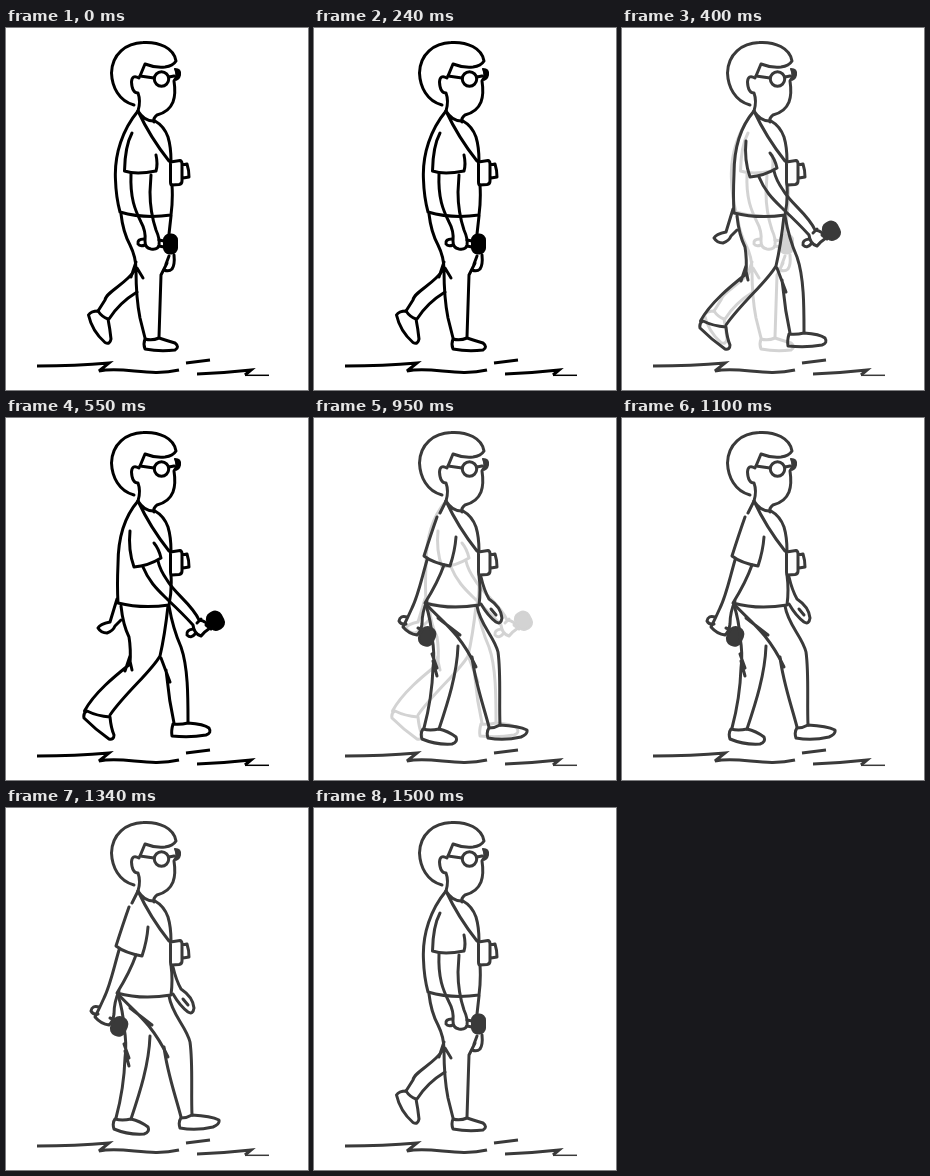
Recreate the animation shown at these times as an HTML page without scripts. Size 302 by 362 pixels, loop 1.65 s.

```html
<!DOCTYPE html>
<html lang="en">
<head>
<meta charset="utf-8">
<title>Walk cycle</title>
<style>
  html, body { margin: 0; width: 100%; height: 100%; overflow: hidden; background: #fff; }
  svg {
    display: block; width: 302px; height: 362px;
    fill: none; stroke: currentColor; stroke-width: 3;
    stroke-linecap: round; stroke-linejoin: round;
  }
  svg, .pose { animation: ink 1650ms step-end infinite; }
  .pose { opacity: 0; }
  .pass { animation-name: pass; }
  .reach { animation-name: reach; }
  .trail { animation-name: trail; }
  .solid { fill: currentColor; stroke-width: 2; }
  .ground { stroke-linecap: butt; stroke-linejoin: miter; }

  @keyframes ink {
    0%, 33.333%, 100% { color: #000; }
    24.242%, 57.576% { color: #3a3a3a; }
  }
  /* each pose leaves a faint afterimage for 150 ms */
  @keyframes pass {
    0%, 90.909%, 100% { opacity: 1; }
    24.242% { opacity: .22; }
    33.333% { opacity: 0; }
  }
  @keyframes reach {
    0%, 66.667%, 100% { opacity: 0; }
    24.242% { opacity: 1; }
    57.576% { opacity: .22; }
  }
  @keyframes trail {
    0%, 90.909%, 100% { opacity: 0; }
    57.576% { opacity: 1; }
  }
</style>
</head>
<body>
<svg viewBox="0 0 302 362">
  <g class="pose pass">
    <!-- shirt -->
    <path d="M126 105Q119 118 118.500 143Q130 147 150 143Q152 136 150 127"/>
    <path d="M132 83C117 101 108 126 109.500 152Q110 169 114 184Q138 191 165 187Q167 172 166 157"/>
    <!-- arm and rattle -->
    <path d="M125 146C124 170 129 182 135 194Q140 203 139 213Q139 220 145 221Q152 222 153 217Q154 211 150 202Q144 184 144 164L145 147"/>
    <path d="M138 211Q131 211 132 216Q134 219 139 217M153 212L158 213M153 218L158 219"/>
    <rect class="solid" x="158" y="206.500" width="13" height="19" rx="5.500"/>
    <path d="M165 188L163 206M168 227Q169 237 166 241Q163 244 158 242M163 228L160 236"/>
    <!-- legs -->
    <path d="M115 186Q117 204 124 217Q130 229 130 242Q130 270 134 290L139 310M130 234L125 249M131 240L137 250"/>
    <path d="M161 235Q158 241 155 247Q154 277 153 309"/>
    <path d="M129 242C120 256 100 264 99 272L92 283M131 264Q113 275 103 291"/>
    <!-- shoes -->
    <path d="M139 311Q137 316 139 321Q154 324 169 322Q174 319 169 315Q162 313 153 310Q146 313 139 311Z"/>
    <path d="M92 283Q85 283 82.500 287Q86 303 99 314.500Q104 317 105 311Q104 301 102 291Q96 289 92 283Z"/>
  </g>

  <g class="pose reach">
    <path d="M132 83C119 98 112 118 112 146Q111 168 112 185Q136 191 163 187Q166 172 165 157"/>
    <path d="M124 113Q122 132 128 149Q142 148 155 140Q153 131 148 125"/>
    <path d="M137 149C143 164 152 172 162 182Q177 196 187 207Q188 216 195 218Q198 214 204 210Q201 203 193 202C186 186 169 176 161 162Q154 152 152 143"/>
    <path d="M187 211Q180 212 181 217Q185 221 189 216M191 205L195 201M200 207L205 211"/>
    <rect class="solid" x="202" y="194" width="15" height="18" rx="6.500" transform="rotate(-28 209 203)"/>
    <path d="M111 181L104 204Q94 206 92 210Q95 215 101 215Q107 213 109 208L115 202"/>
    <path d="M115 188Q117 207 123 219Q125 231 124 246C109 258 88 275 78.500 293M124 238L119 253M124 243L126 252"/>
    <path d="M162 188C160 206 157 225 154 238C145 254 120 274 104 297"/>
    <path d="M163 188Q167 211 175 229C182 249 182 278 182 304M155 240L164 264M160 252L161 260Q163 282 168 305"/>
    <path d="M167 306Q165 313 166 318Q184 320 200 317Q206 315 203 310Q198 306 182 305Q174 307 167 306Z"/>
    <path d="M81 293Q77 295 78 300Q90 312 103 321Q108 322 108 317Q105 310 104 299Q91 298 81 293Z"/>
  </g>

  <g class="pose trail">
    <path d="M132 83L126 95M123 99Q117 116 110 138Q119 145 136 148Q141 133 142 119"/>
    <path d="M130 147Q124 164 111 185Q136 192 165 187Q167 172 165 157"/>
    <path d="M113 142C107 163 104 178 98 190Q94 199 89 209Q95 216 103 217Q107 214 108 206Q108 194 113 183"/>
    <path d="M93 199Q86 197 85 203Q87 207 92 206M104 210L109 212"/>
    <rect class="solid" x="106" y="209" width="14.500" height="18.500" rx="6.500" transform="rotate(24 113 218)"/>
    <path d="M167 159Q170 172 175 181Q187 189 188 200Q187 207 182 204Q174 198 167 186M177 191L182 197"/>
    <path d="M112 187Q117 203 118 219Q121 236 119 250Q118 280 110 310M118 236L123 250M119 243L123 258"/>
    <path d="M112 186C126 202 145 213 162 249M124 200L146 217M144 228C143 256 134 284 125 311"/>
    <path d="M163 188C166 207 180 218 184 234C187 255 185 283 186 307M158 239C161 264 169 286 175 309"/>
    <path d="M109 311Q106 315 108 321Q122 327 138 326Q144 324 142 319Q134 313 125 311Q116 313 109 311Z"/>
    <path d="M175 310Q172 314 174 320Q190 323 207 319Q214 316 213 312Q205 308 186 307Q181 310 175 310Z"/>
  </g>

  <!-- head -->
  <path d="M128 77C113 73 106 59 105.500 45C106 26 120 15 137 14.500C153 13.500 168 20 170 33Q167 38 159 39Q149 40 139 36L134 48"/>
  <path d="M133 50Q126 46 125.500 54Q126 65 132 65Q135 73 132 83"/>
  <path d="M168 53Q170 66 167 74Q163 84 151 87Q147 90 148 94"/>
  <circle cx="155.500" cy="51" r="7.200"/>
  <path d="M134 48L148 50M163 49L168 48"/>
  <path class="solid" stroke-width="1.500" d="M169 41Q175 41 174 47Q173 52 168 52Q172 47 169 41Z"/>
  <!-- collar, strap and camera -->
  <path d="M132 83Q139 94 149 93Q158 98 162 109Q165 119 165 133M132 83Q144 109 163 133"/>
  <path d="M164.500 134L174 132.500Q176 133 176 136L176 153Q176 156 173 156.500L166 157Q164.500 157 164.500 154ZM176 137L181 136Q183 142 183 149L177 150"/>

  <g class="ground">
    <path d="M31 338Q70 338 103 335L93 343C118 338 143 349 173 342"/>
    <path d="M180 335L204 332M191 346Q218 345 245 342L239 347"/>
    <path stroke-width="1.500" d="M239 347.300L263 347.300"/>
  </g>
</svg>
</body>
</html>
```
